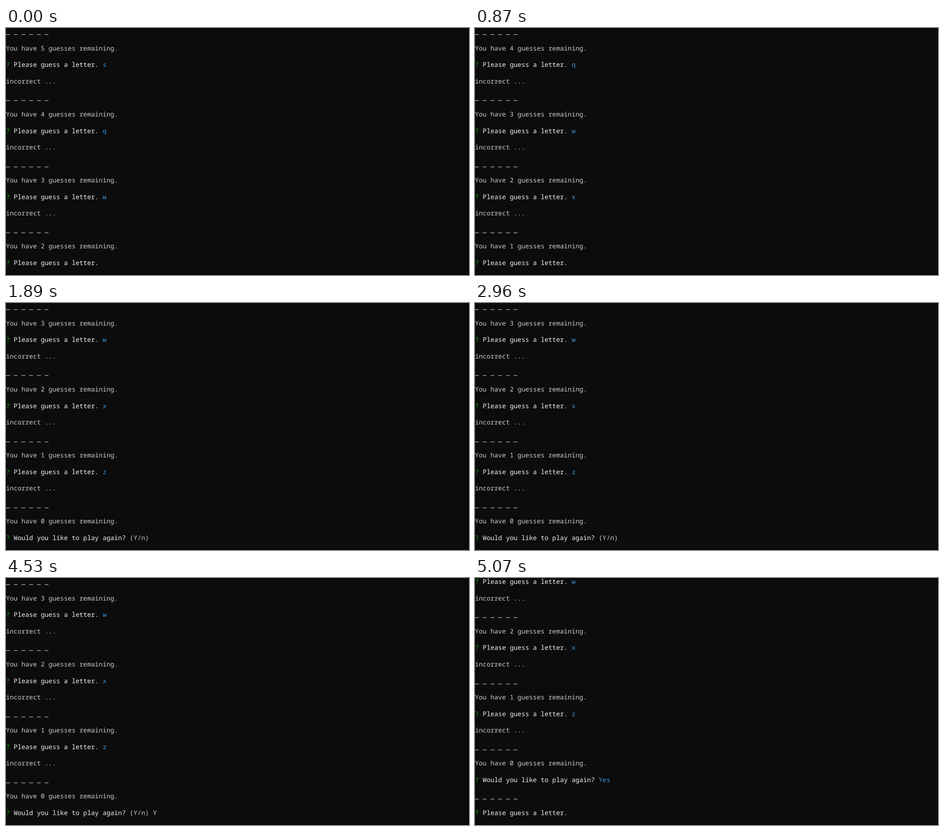
These frames come from a looping animation (1025 by 547 pixels, 5.3 s). An HTML page with a canvas:

```html
<!DOCTYPE html>
<html lang="en">
<head>
<meta charset="utf-8">
<title>Word guessing game</title>
<style>
  html, body { margin: 0; width: 100%; height: 100%; overflow: hidden; background: #0c0c0c; }
  canvas { display: block; }
</style>
</head>
<body>
<canvas id="stage" width="1025" height="547"></canvas>
<script>
const ctx = document.getElementById('stage').getContext('2d');
const LOOP = 5300;
const CELL = 8.556, LINE = 18.27, BASELINE = 13.3;
const LAST_ROW = 28;
const GRAY = '#cccccc', WHITE = '#f2f2f2', GREEN = '#13a10e', BLUE = '#3a96dd';

const LETTER = 'Please guess a letter.';
const AGAIN = 'Would you like to play again?';
const ANSWERS = 'sqwxz';

// Each step: start time, cursor column (0 = hidden), round at the prompt, typed text.
const STEPS = [
  [0, 0, 3, ''],
  [320, 25, 3, ''],
  [560, 26, 3, 'x'],
  [710, 25, 4, ''],
  [870, 0, 4, ''],
  [1340, 25, 4, ''],
  [1660, 26, 4, 'z'],
  [1890, 0, 5, ''],
  [2420, 38, 5, ''],
  [2960, 0, 5, ''],
  [3510, 38, 5, ''],
  [3980, 0, 5, ''],
  [4060, 39, 5, 'Y'],
  [4530, 0, 5, 'Y'],
  [4670, 25, 6, ''],
  [5070, 0, 6, '']
];

function write(text, col, row, color) {
  ctx.fillStyle = color;
  [...text].forEach((char, i) => {
    if (char !== ' ') ctx.fillText(char, (col + i) * CELL, BASELINE + row * LINE);
  });
}

function prompt(question, answer, row, color = BLUE) {
  write('?', 0, row, GREEN);
  write(question, 2, row, WHITE);
  write(answer, question.length + 3, row, color);
}

function blanks(row) {
  write('_ _ _ _ _ _', 0, row, GRAY);
}

function drawRound(index, row, current, typed) {
  blanks(row);
  write(`You have ${5 - index} guesses remaining.`, 0, row + 2, GRAY);
  if (index === 5) {
    if (current === 5) prompt(AGAIN, '(Y/n) ' + typed, row + 4, GRAY);
    else prompt(AGAIN, 'Yes', row + 4);
  } else if (index === current) {
    prompt(LETTER, typed, row + 4, GRAY);
  } else {
    prompt(LETTER, ANSWERS[index], row + 4);
    write('incorrect ...', 0, row + 6, GRAY);
  }
}

function draw(time) {
  const [, cursor, current, typed] = STEPS.findLast(step => step[0] <= time);
  ctx.fillStyle = '#0c0c0c';
  ctx.fillRect(0, 0, 1025, 547);

  const restarted = current === 6;
  const top = restarted ? 20 : (current - 3) * 8;
  for (let i = 0; i <= Math.min(current, 5); i++) {
    const row = i * 8 - top;
    if (row > -8) drawRound(i, row, current, typed);
  }
  if (restarted) {
    blanks(LAST_ROW - 2);
    prompt(LETTER, '', LAST_ROW);
  }
  if (cursor) {
    ctx.fillStyle = WHITE;
    ctx.fillRect(cursor * CELL, 524.2, CELL, 4.5);
  }

  ctx.fillStyle = '#000';
  ctx.fillRect(1024, 0, 1, 547);
  ctx.fillRect(0, 546, 1025, 1);
}

ctx.font = '14.26px "Noto Sans Mono", "DejaVu Sans Mono", monospace';
ctx.textRendering = 'geometricPrecision';

const start = performance.now();
function tick() {
  draw((performance.now() - start) % LOOP);
  requestAnimationFrame(tick);
}
tick();
</script>
</body>
</html>
```
